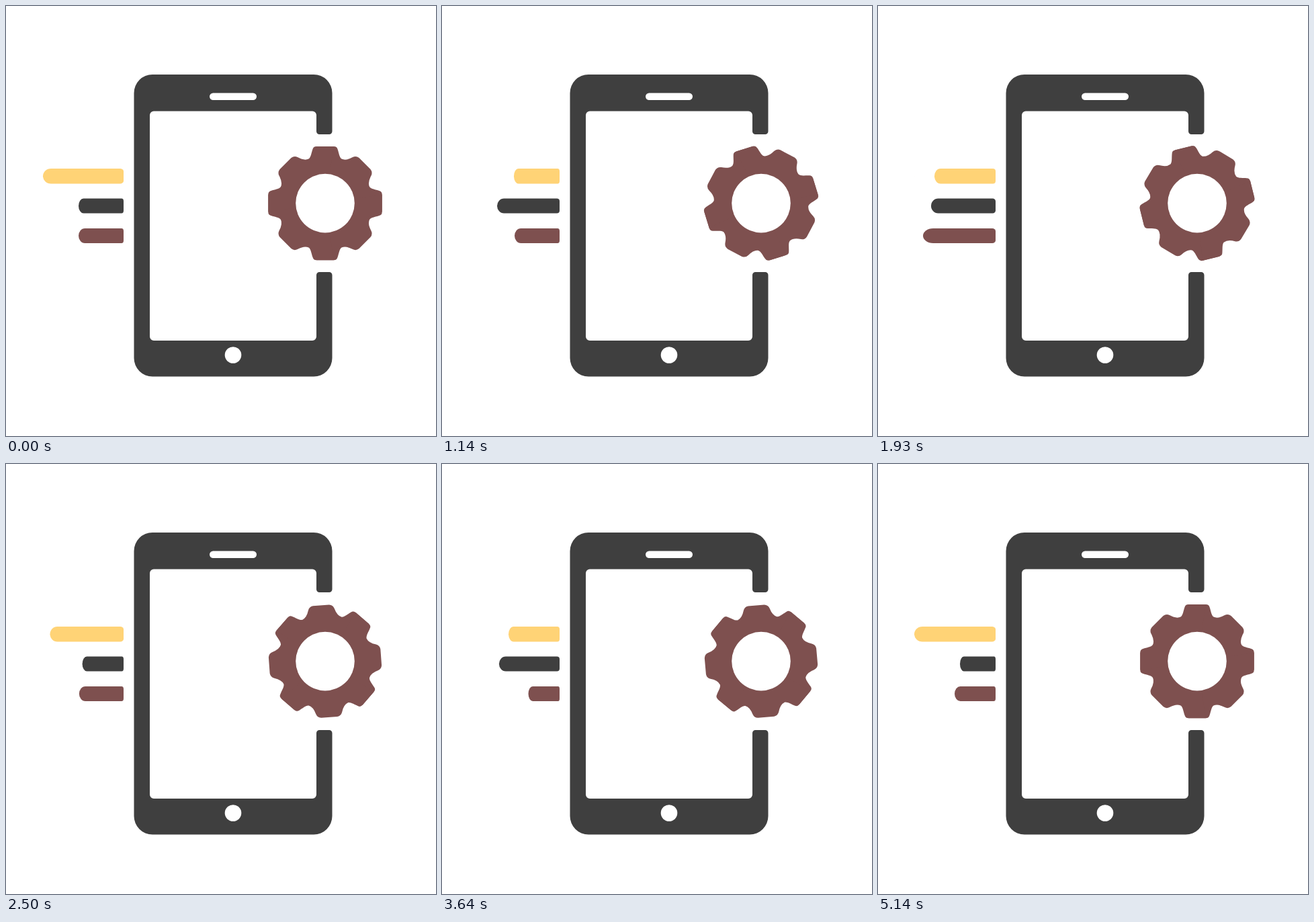
These frames come from a looping animation (640 px wide and 640 px high, 5210 ms). An HTML page:

```html
<!DOCTYPE html>
<html lang="en">
<head>
<meta charset="utf-8">
<title>Phone with turning gear</title>
<style>
  html, body { margin: 0; width: 100%; height: 100%; overflow: hidden; background: #fff; }
  svg { display: block; width: 100%; height: 100%; }
</style>
</head>
<body>
<svg viewBox="0 0 640 640">
  <g id="bars"></g>
  <path fill="#3f3f3f" d="M458 102H218A27.5 27.5 0 0 0 190.500 129.500V524A27.5 27.5 0 0 0 218 551.500H458A27.5 27.5 0 0 0 485.500 524V400.500a4.5 4.5 0 0 0-4.5-4.5H466.500a4.5 4.5 0 0 0-4.5 4.5V492a6 6 0 0 1-6 6H220a6 6 0 0 1-6-6V162.500a6 6 0 0 1 6-6H456a6 6 0 0 1 6 6V186.500a4.5 4.5 0 0 0 4.5 4.5H481a4.5 4.5 0 0 0 4.5-4.5V129.500A27.5 27.5 0 0 0 458 102Z"/>
  <rect x="303" y="129.5" width="70" height="10.5" rx="5.25" fill="#fff"/>
  <circle cx="338" cy="519.5" r="12.3" fill="#fff"/>
  <g transform="translate(475 293.6)">
    <g id="gear" fill="#7e504f">
      <!-- Quarters overlap across the straight teeth -->
      <path id="quarter" d="M0 0L-13-84.700H13Q17.500-84.700 18.500-80.500C20.5-75 21-68.500 24.5-66Q31-63 41-68.500Q46-71 50.500-67.500L67.500-50.500Q71-46 68.500-41Q63-31 66-24.500C68.500-21 75-20.500 80.500-18.500Q84.700-17.500 84.700-13V13Z"/>
      <use href="#quarter" transform="rotate(90)"/>
      <use href="#quarter" transform="rotate(180)"/>
      <use href="#quarter" transform="rotate(270)"/>
    </g>
    <circle r="43.8" fill="#fff"/>
  </g>
</svg>
<script>
const LOOP = 5210, FPS = 14, STEPS = 73, BAR_RIGHT = 175;

// Key poses: step, gear angle, lengths of the three bars
const poses = [
  [0, 0, 120, 67, 67],
  [6, 6, 100, 105, 110],
  [16, 73, 68, 93, 67],
  [27, 166, 91, 96, 108],
  [41, 256, 126, 49, 49],
  [60, 343.5, 39, 131, 51],
  [72, 360, 121, 53, 61]
];
poses.push([STEPS, 360, ...poses[0].slice(2)]);

// "tip" is the rounded end as a share of the bar's length
const bars = [
  { y: 242, h: 22.5, fill: "#ffd376", tip: 0.1 },
  { y: 286.5, h: 22, fill: "#3f3f3f", tip: 0.11 },
  { y: 331, h: 22, fill: "#7e504f", tip: 0.14 }
];

// Smooth curve through one column of the poses; "swing" adds a wave between them
function sample(column, step, swing = 0) {
  const slope = i => (poses[i + 1][column] - poses[i][column]) / (poses[i + 1][0] - poses[i][0]);
  const tangent = i => {
    if (i === 0 || i === poses.length - 1) return 0;
    const a = slope(i - 1), b = slope(i);
    return a * b > 0 ? 2 * a * b / (a + b) : 0;
  };
  const i = poses.findIndex(pose => pose[0] > step) - 1;
  const [from, to] = [poses[i], poses[i + 1]];
  const span = to[0] - from[0], u = (step - from[0]) / span, v = 1 - u;
  return v * v * ((1 + 2 * u) * from[column] + u * span * tangent(i))
       + u * u * ((1 + 2 * v) * to[column] - v * span * tangent(i + 1))
       + swing * span * Math.sin(2 * Math.PI * u);
}

// Bar of unit width ending at x = 0, stretched by its length
function barPath({ h, tip }) {
  const r = h / 2, c = 0.045, k = 4;
  return `M${-c} 0H${tip - 1}A${tip} ${r} 0 0 0 ${tip - 1} ${h}H${-c}` +
         `A${c} ${k} 0 0 0 0 ${h - k}V${k}A${c} ${k} 0 0 0 ${-c} 0Z`;
}

const gear = document.getElementById("gear");
const group = document.getElementById("bars");
for (const bar of bars) {
  bar.node = document.createElementNS(group.namespaceURI, "path");
  bar.node.setAttribute("d", barPath(bar));
  bar.node.setAttribute("fill", bar.fill);
  group.append(bar.node);
}

function draw() {
  const step = Math.floor((performance.now() % LOOP + 5) * FPS / 1000);
  gear.setAttribute("transform", `rotate(${sample(1, step)})`);
  bars.forEach((bar, i) => {
    const length = sample(i + 2, step, 1);
    bar.node.setAttribute("transform", `translate(${BAR_RIGHT} ${bar.y}) scale(${length} 1)`);
  });
  requestAnimationFrame(draw);
}
draw();
</script>
</body>
</html>
```
